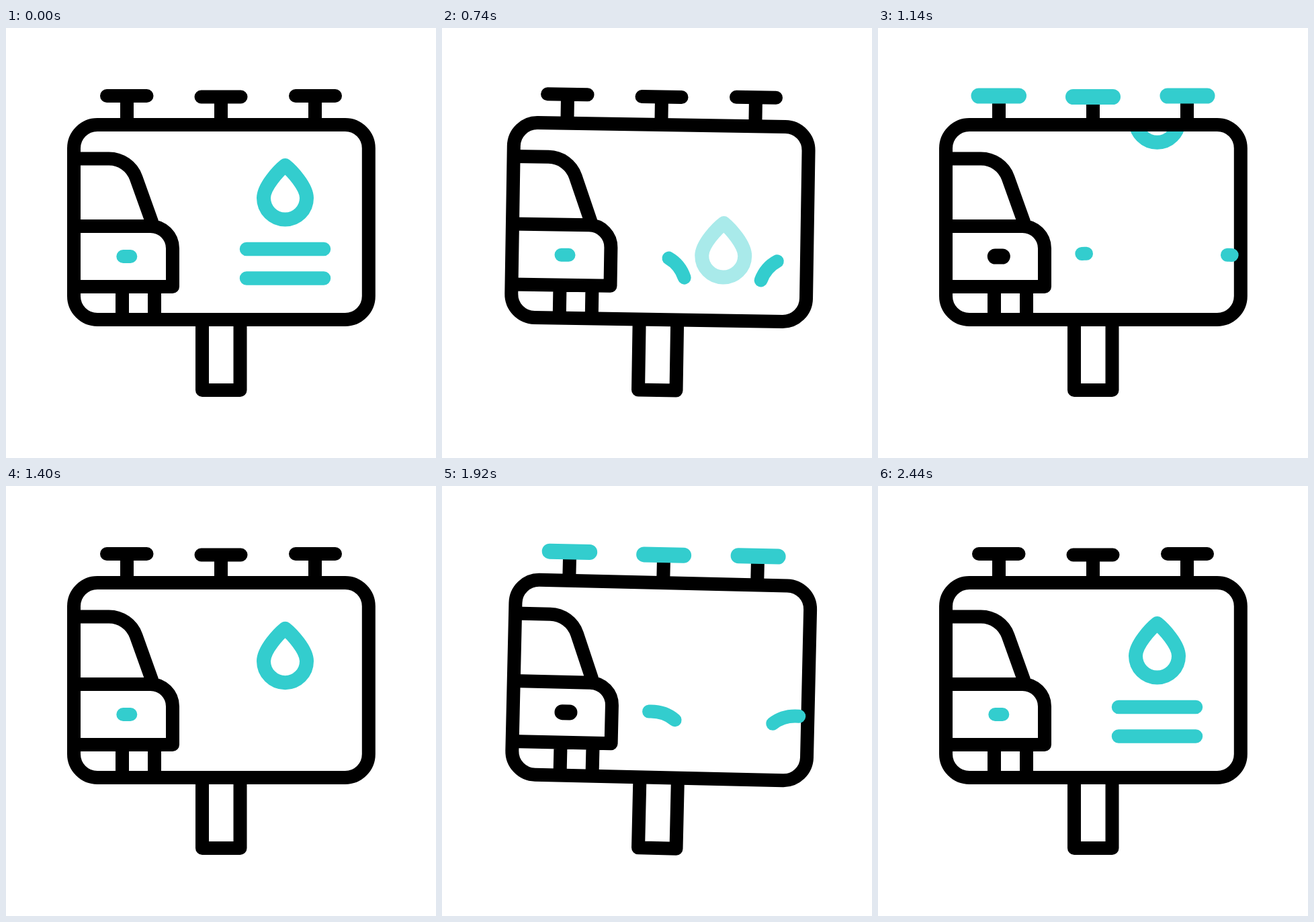
Recreate the animation shown at these times as an HTML page with a canvas. Size 640 by 640 pixels, loop 2500 ms.

```html
<!DOCTYPE html>
<html lang="en">
<head>
<meta charset="utf-8">
<title>Car wash billboard</title>
<style>
  html, body { margin: 0; height: 100%; overflow: hidden; background: #fff; }
  canvas { display: block; width: 100vmin; height: 100vmin; }
</style>
</head>
<body>
<canvas id="stage" width="640" height="640"></canvas>
<script>
const ctx = document.getElementById('stage').getContext('2d');
const LOOP = 2500, CYCLE = 900;
const BLACK = '#000', CYAN = '#33cdce';

const DROP = new Path2D('M415.5 204.5C406 212 383.5 236 383.5 253A32 32 0 0 0 447.5 253C447.5 236 425 212 415.5 204.5Z');
const SPLASHES = [
  new Path2D('M358 371C349 346 327 334 302 336'),
  new Path2D('M472 373C481 348 503 336 528 338')
];
const SPLASH_LENGTH = 70;
const FRAME = new Path2D();
FRAME.roundRect(101, 144, 438.8, 290, 35);
const CAR = new Path2D('M101 194.5H153A43 43 0 0 1 193.6 223L217.6 290M101 295H215A33 33 0 0 1 248 328V385H101M173 385V434M221 385V434');
const POLE = new Path2D('M292 434V539H348.5V434');
const STEMS = new Path2D('M180 101V144M320 102V144M460 101V144');
const LAMPS = new Path2D('M150 101H209.5M290.5 102.5H349.5M431 101H490');
const HEADLIGHT = new Path2D('M174.3 340H185.3');

const progress = (t, from, to) => Math.min(1, Math.max(0, (t - from) / (to - from)));
const ease = (t, from, to) => (1 - Math.cos(Math.PI * progress(t, from, to))) / 2;

function stroke(path, color, width = 20, cap = 'round') {
  ctx.strokeStyle = color;
  ctx.lineWidth = width;
  ctx.lineCap = cap;
  ctx.stroke(path);
}

function withAlpha(alpha, draw) {
  if (alpha <= 0) return;
  ctx.globalAlpha = alpha;
  draw();
  ctx.globalAlpha = 1;
}

function dropOffset(t) {
  if (t < 975) return 86 * ease(t, 320, 780);
  if (t < 1980) return -145 + 231 * ease(t, 975, 1680);
  return -145 + 145 * ease(t, 1980, 2420);
}

function drawDrop(t, local) {
  const alpha = t < 975 || t < 1980 && t > 1300 ? 1 - progress(local, 680, 785) : 1;
  ctx.save();
  ctx.clip(FRAME);
  ctx.translate(0, dropOffset(t));
  withAlpha(alpha, () => stroke(DROP, CYAN, 21));
  ctx.restore();
}

function drawTextLines(t) {
  const size = 1 - ease(t, 20, 320) + ease(t, 2140, 2420);
  if (size < 0.005) return;
  const end = 358 + 115 * size;
  stroke(new Path2D(`M358 329H${end}M358 372.5H${end}`), CYAN, 20.5);
}

function drawSplashes(local) {
  const head = ease(local, 575, 890), tail = ease(local, 874, 1208);
  if (head - tail < 0.005) return;
  ctx.setLineDash([(head - tail) * SPLASH_LENGTH, 999]);
  ctx.lineDashOffset = -tail * SPLASH_LENGTH;
  SPLASHES.forEach(path => stroke(path, CYAN));
  ctx.setLineDash([]);
}

function draw(t) {
  // The two splashes share one timeline
  const local = t < 1300 ? t : t - CYCLE;
  const tilt = 2 * Math.sin(Math.PI * progress(local, 672, 1126));
  const lit = progress(local, 760, 820) - progress(local, 1240, 1300);

  ctx.fillStyle = '#fff';
  ctx.fillRect(0, 0, 640, 640);
  ctx.save();
  ctx.lineJoin = 'round';
  ctx.translate(320, 540);
  ctx.rotate(tilt * Math.PI / 180);
  ctx.translate(-320, -540);

  drawDrop(t, local);
  stroke(STEMS, BLACK, 20, 'butt');
  stroke(LAMPS, BLACK);
  stroke(POLE, BLACK, 20, 'butt');
  stroke(CAR, BLACK, 20, 'butt');
  stroke(FRAME, BLACK);
  stroke(HEADLIGHT, CYAN);
  withAlpha(lit, () => {
    stroke(LAMPS, CYAN, 23);
    stroke(HEADLIGHT, BLACK, 23);
  });
  drawTextLines(t);
  drawSplashes(local);
  ctx.restore();
}

const start = performance.now();
function tick() {
  draw((performance.now() - start) % LOOP);
  requestAnimationFrame(tick);
}
tick();
</script>
</body>
</html>
```
